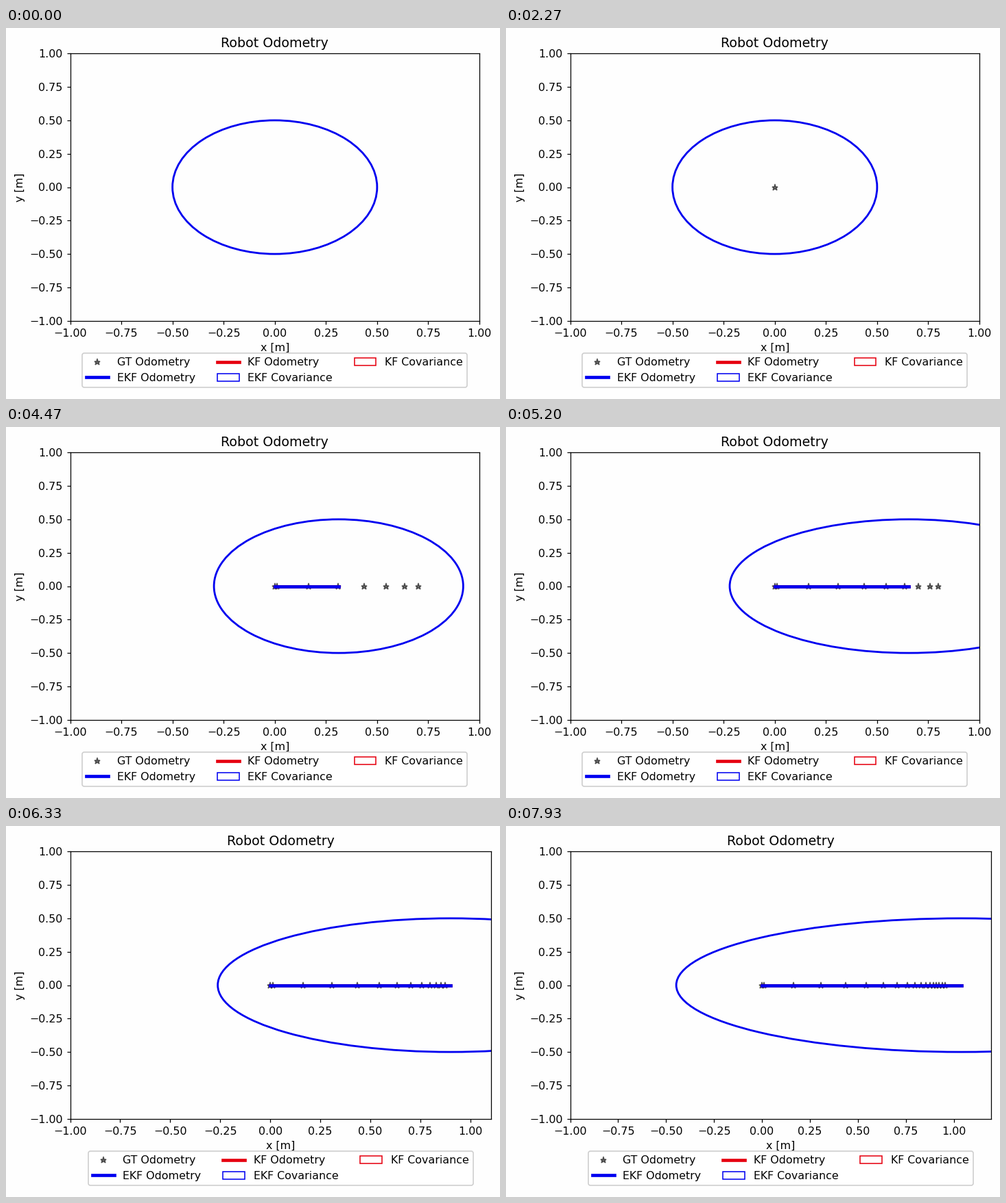
These frames come from a looping animation (720 px wide and 542 px high, 8 s). A matplotlib script:

```python
import numpy as np
import matplotlib.pyplot as plt
from matplotlib.animation import FuncAnimation
from matplotlib.lines import Line2D
from matplotlib.patches import Ellipse

W, H, DPI = 720, 542, 112.5
FRAMES, INTERVAL = 160, 50
PAPER, BLUE, RED = "#fefefe", "#0000f0", "#e6000f"

# Axes box in pixels, measured from the top left
LEFT, RIGHT, TOP, BOTTOM = 93.5, 690, 37.25, 427.75
MAX_RIGHT = 707.2
UNIT = (RIGHT - LEFT) / 2

STAR_START, STAR_STEP = 2.0, 0.345


def smoothstep(t, start, end):
    u = np.clip((t - start) / (end - start), 0, 1)
    return u * u * (3 - 2 * u)


def true_path(count):
    """Readings of a robot that brakes to a slow crawl."""
    steps = np.arange(1, count - 1)
    gaps = 0.0145 + 0.143 * np.exp(-steps ** 2 / 38)
    return np.cumsum([0, 0.012, *gaps])[:count]


def estimate(t):
    """Filter position: a slow drift plus one catch-up move."""
    return 0.0865 * max(0, t - 2.78) + 0.595 * smoothstep(t, 3.67, 5.99)


def half_width(t):
    """Standard deviation in x; the variance ends up growing linearly."""
    growth = 0.535 * 0.1 * np.logaddexp(0, (t - 4.26) / 0.1)
    return np.sqrt(0.25 + growth)


def x_limit(t):
    return 1 + 0.243 * (1 - np.exp(-max(0, t - 5.48) / 1.5))


plt.rcParams.update({"font.family": "DejaVu Sans", "font.size": 10.16})
fig = plt.figure(figsize=(W / DPI, H / DPI), dpi=DPI, facecolor=PAPER)
ax = fig.add_axes([0.1, 0.1, 0.8, 0.8], facecolor=PAPER)
ax.set(title="Robot Odometry", xlabel="x [m]", ylabel="y [m]", ylim=(-1, 1))
for axis in (ax.xaxis, ax.yaxis):
    axis.set_major_locator(plt.MultipleLocator(0.25))

stars, = ax.plot([], [], "k*", ms=6, alpha=0.55, label="GT Odometry")
kf_line, = ax.plot([], [], color=RED, lw=3, label="KF Odometry")
ekf_line, = ax.plot([], [], color=BLUE, lw=3, label="EKF Odometry")


def covariance(color, width, label):
    return ax.add_patch(Ellipse((0, 0), 1, 1, fill=False, ec=color, lw=width,
                                label=label))


kf_cov = covariance(RED, 0.8, "KF Covariance")
ekf_cov = covariance(BLUE, 1.8, "EKF Covariance")

legend = ax.legend(handles=[stars, ekf_line, kf_line, ekf_cov, kf_cov],
                   loc="upper center", bbox_to_anchor=(0.5, -0.1), ncol=3,
                   framealpha=1)
for patch in legend.get_patches():
    patch.set_linewidth(1)

# Dark window border on the right
fig.add_artist(Line2D([(W - 0.5) / W] * 2, [0, 1], color="#2a2a2a",
                      lw=72 / DPI))


def fit_axes(limit):
    """Widen the axes until the right margin is used up."""
    right = min(LEFT + UNIT * (1 + limit), MAX_RIGHT)
    ax.set_position([LEFT / W, 1 - BOTTOM / H,
                     (right - LEFT) / W, (BOTTOM - TOP) / H])
    ax.set_xlim(-1, limit)


def update(i):
    t = (i + 0.5) * INTERVAL / 1000
    fit_axes(x_limit(t))

    seen = true_path(max(0, int((t - STAR_START) // STAR_STEP) + 1))
    stars.set_data(seen, np.zeros(len(seen)))

    x = estimate(t)
    path = ([0, x], [0, 0]) if x > 0 else ([], [])
    for line in (kf_line, ekf_line):
        line.set_data(*path)
    for ellipse in (kf_cov, ekf_cov):
        ellipse.set_center((x, 0))
        ellipse.set_width(2 * half_width(t))
    return []


anim = FuncAnimation(fig, update, frames=FRAMES, init_func=lambda: update(0),
                     interval=INTERVAL, repeat=True, repeat_delay=0,
                     blit=False)
plt.show()
```
